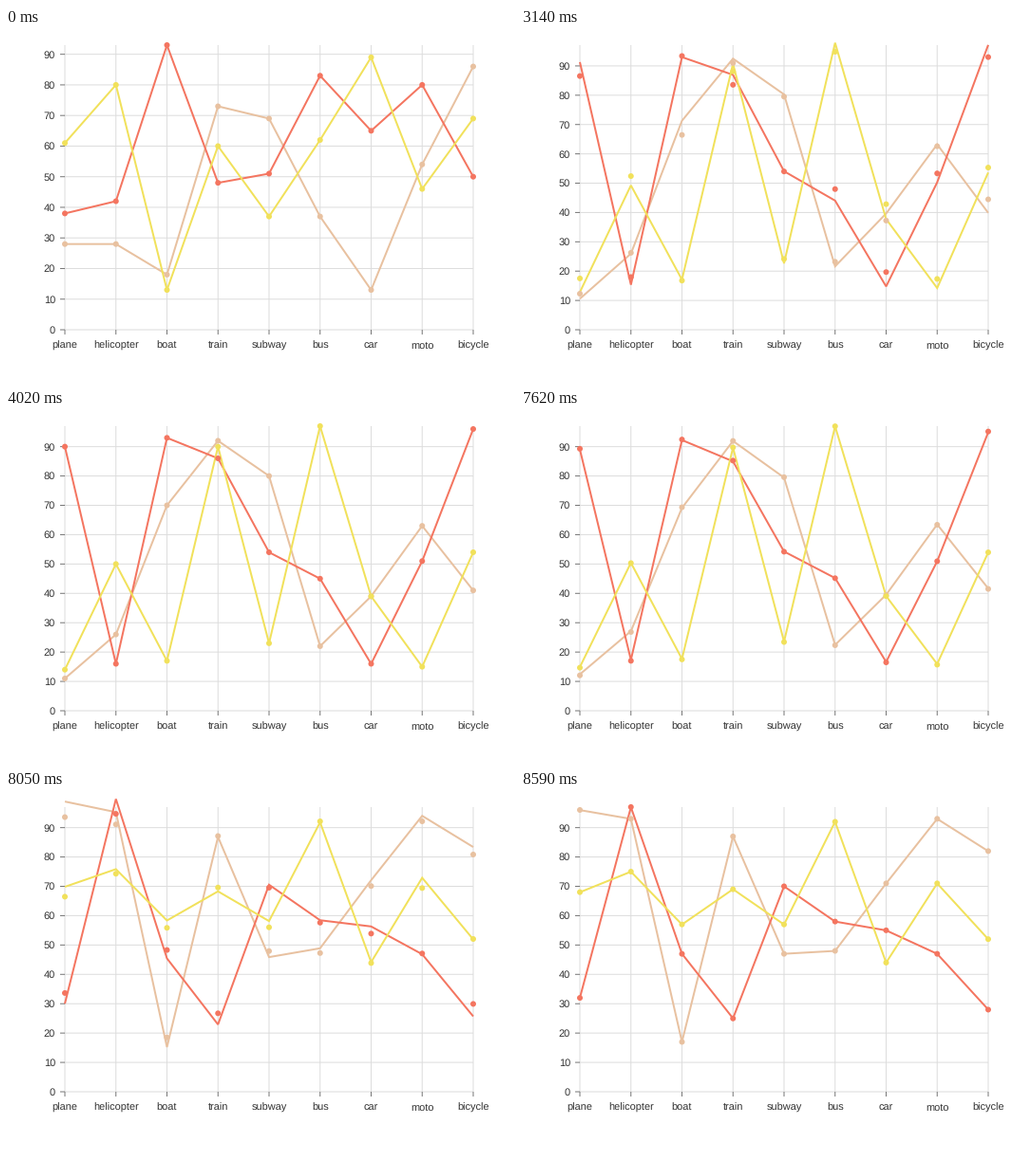
Recreate the animation shown at these times as a matplotlib script. Size 536 px wide and 372 px high, loop 8.62 s.

```python
import matplotlib.pyplot as plt
import numpy as np
from matplotlib.animation import FuncAnimation
from matplotlib.collections import LineCollection

W, H, DPI = 536, 372, 100
PT = 72 / DPI                       # points per pixel
LEFT, RIGHT, TOP, BASE = 62, 492, 18, 318
LOOP, STEP = 8620, 20

MODES = ["plane", "helicopter", "boat", "train", "subway",
         "bus", "car", "moto", "bicycle"]
COLORS = ["#e8c1a0", "#f47560", "#f1e15b"]
DATA = np.array([
    [[28, 28, 18, 73, 69, 37, 13, 54, 86],
     [38, 42, 93, 48, 51, 83, 65, 80, 50],
     [61, 80, 13, 60, 37, 62, 89, 46, 69]],
    [[11, 26, 70, 92, 80, 22, 39, 63, 41],
     [90, 16, 93, 86, 54, 45, 16, 51, 96],
     [14, 50, 17, 90, 23, 97, 39, 15, 54]],
    [[96, 93, 17, 87, 47, 48, 71, 93, 82],
     [32, 97, 47, 25, 70, 58, 55, 47, 28],
     [68, 75, 57, 69, 57, 92, 44, 71, 52]],
])
TICKS = np.arange(0, 100, 10)

# start (ms), hold after the first step (ms), spring steps per ms
MOVES = [(2860, 0, 0.0687), (7620, 60, 0.0625)]


def spring(stiffness, damping, steps=120, dt=1 / 60):
    """Positions of a 0-to-1 spring, one per 60 Hz step."""
    x, v, path = 0.0, 0.0, [0.0]
    for _ in range(steps):
        v += (stiffness * (1 - x) - damping * v) * dt
        x += v * dt
        path.append(x)
    path[-1] = 1.0
    return np.array(path)


LINE_SPRING = spring(120, 15)
DOT_SPRING = spring(90, 15)


def to_y(values, top):
    return BASE - (BASE - TOP) * values / top


tops = DATA.max(axis=(1, 2))
point_y = np.array([to_y(d, m) for d, m in zip(DATA, tops)])
tick_y = np.array([to_y(TICKS, m) for m in tops])
xs = np.linspace(LEFT, RIGHT, len(MODES))


def ease(path, n):
    return np.interp(n, np.arange(len(path)), path)


def progress(t):
    """Index of the starting data set and line / dot fractions."""
    for i, (start, hold, rate) in reversed(list(enumerate(MOVES))):
        if t >= start:
            n = 0.5 + max(0, t - start - hold) * rate
            return i, ease(LINE_SPRING, n), ease(DOT_SPRING, n)
    return 0, 0.0, 0.0


def mix(states, i, k):
    return states[i] + (states[i + 1] - states[i]) * k


def h_lines(x0, x1, ys):
    return [[(x0, y), (x1, y)] for y in ys]


def v_lines(y0, y1):
    return [[(x, y0), (x, y1)] for x in xs]


plt.rcParams.update({"font.family": "Liberation Sans",
                     "font.size": 11 * PT,
                     "text.color": "#333333",
                     "text.hinting": "none"})
fig = plt.figure(figsize=(W / DPI, H / DPI), dpi=DPI, facecolor="white")
ax = fig.add_axes([0, 0, 1, 1])
ax.set(xlim=(0, W), ylim=(H, 0))
ax.axis("off")


def strokes(color, z):
    group = LineCollection([], colors=color, linewidths=PT, zorder=z,
                           snap=False, capstyle="butt")
    ax.add_collection(group, autolim=False)
    return group


grid = strokes("#dddddd", 1)
marks = strokes("#777777", 2)

for x, name in zip(xs, MODES):
    ax.text(x, 338, name, ha="center", va="baseline")
labels = [ax.text(52, 0, str(v), ha="right", va="baseline") for v in TICKS]

lines = [ax.plot(xs, xs, color=c, lw=2 * PT, solid_joinstyle="miter",
                 solid_capstyle="butt", clip_on=False, zorder=4)[0]
         for c in COLORS]
dots = ax.scatter(np.tile(xs, 3), np.zeros(3 * len(xs)), s=(6 * PT) ** 2,
                  c=np.repeat(COLORS, len(xs)), linewidths=0,
                  clip_on=False, zorder=5)
ax.set(xlim=(0, W), ylim=(H, 0))


def draw(frame):
    i, k_line, k_dot = progress(frame * STEP)
    ys = mix(tick_y, i, k_line)
    grid.set_segments(v_lines(TOP, BASE) + h_lines(LEFT, RIGHT, ys))
    marks.set_segments(v_lines(BASE, BASE + 5) + h_lines(LEFT - 5, LEFT, ys))
    for label, y in zip(labels, ys):
        label.set_y(y + 3.8)
    for line, y in zip(lines, mix(point_y, i, k_line)):
        line.set_ydata(y)
    dots.set_offsets(np.column_stack([np.tile(xs, 3),
                                      mix(point_y, i, k_dot).ravel()]))
    return [grid, marks, dots, *lines, *labels]


anim = FuncAnimation(fig, draw, frames=LOOP // STEP, interval=STEP,
                     init_func=lambda: draw(0), repeat=True, repeat_delay=0)
plt.show()
```
